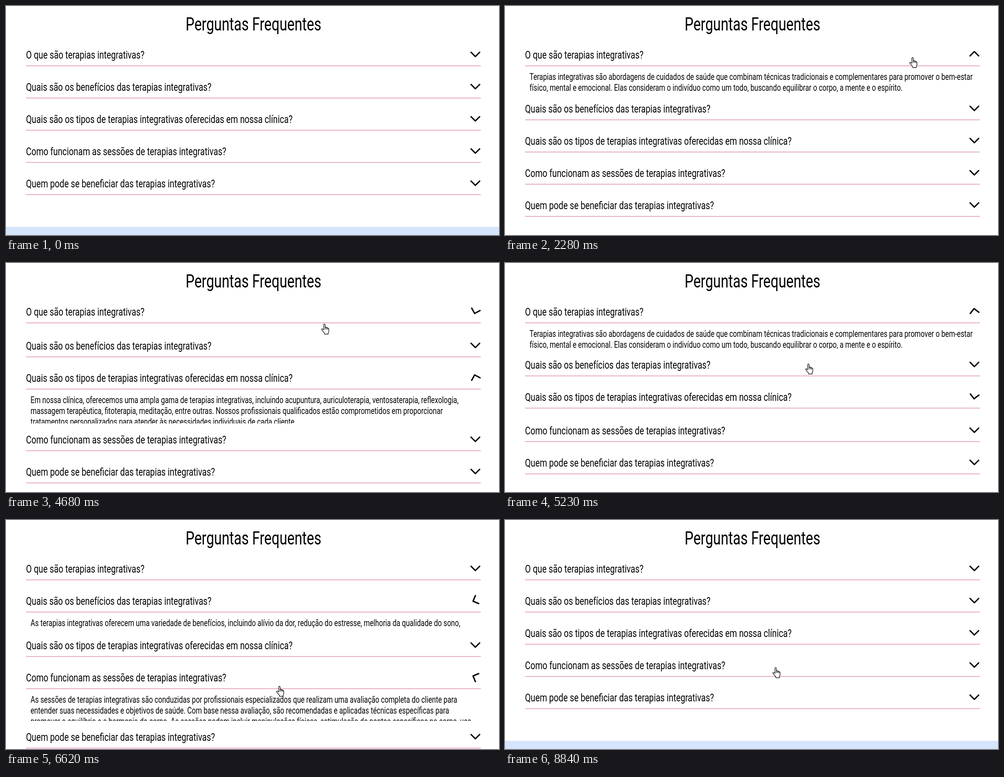
An HTML page for the animation above (8.91 s loop, 1084 by 505 pixels).

```html
<!DOCTYPE html>
<html lang="pt-BR">
<head>
<meta charset="utf-8">
<title>Perguntas Frequentes</title>
<style>
  html, body { margin: 0; width: 100%; height: 100%; overflow: hidden; background: #fff; }
  body { font-family: Roboto, "Liberation Sans", sans-serif; color: #000; }
  #stage { position: relative; width: 1084px; height: 505px; overflow: hidden; }
  /* one factor gives the whole page its condensed look */
  .narrow { display: block; width: max-content; white-space: pre; transform: scaleX(.764); transform-origin: 0 0; }
  h1 { position: absolute; top: 17px; left: 0; width: 1089px; margin: 0; font-size: 40px; font-weight: 400; line-height: 47px; }
  h1 .narrow { margin: 0 auto; transform-origin: 50% 0; }
  #list { position: absolute; top: 92px; left: 0; width: 1084px; }
  .item { margin: 0 40px 20px 44px; }
  .head { position: relative; height: 39px; border-bottom: 2px solid #e8b0c5; font-size: 24px; line-height: 32px; }
  .head svg { position: absolute; right: 0; top: 2px; width: 24px; height: 24px; overflow: visible; }
  .head path { fill: none; stroke: #000; stroke-width: 3; stroke-linecap: round; stroke-linejoin: round; }
  .answer { margin-top: 10px; height: 0; overflow: hidden; font-size: 20px; line-height: 24px; }
  .answer .narrow { position: relative; top: 1px; left: 10px; }
  #band { margin-top: 60px; height: 200px; background: #d6e5fc; }
  #hand { position: absolute; left: 0; top: 0; width: 18px; height: 24px; overflow: visible; }
  #press { fill: #ff0; fill-opacity: .5; }
  #hand path { fill: #fff; stroke: #000; stroke-width: 1.2; stroke-linejoin: round; stroke-linecap: round; }
</style>
</head>
<body>
<div id="stage">
  <h1><span class="narrow">Perguntas Frequentes</span></h1>
  <div id="list"><div id="band"></div></div>
  <svg id="hand">
    <circle id="press" cx="6" cy="0" r="12"/>
    <path d="M5.6 13.4V2.2a1.5 1.5 0 0 1 3.1 0V8c.4-1.1 2.9-.9 2.9.5V9c.5-1 2.8-.8 2.8.7v.5c.5-.8 2.4-.5 2.4 1V16c0 2-1.2 3-1.5 4.6v2.3H7.5V21C6 18.4 2.5 15 1.2 13.2c-1-1.6.8-2.6 2.2-1.6z"/>
    <path d="M8.7 8v4M11.6 9v3M14.4 10v2.2"/>
  </svg>
</div>
<script>
const LOOP = 8910, SLIDE = 500, PRESS = 130;

const faq = [
  ['O que são terapias integrativas?',
   'Terapias integrativas são abordagens de cuidados de saúde que combinam técnicas tradicionais e complementares para promover o bem-estar',
   'físico, mental e emocional. Elas consideram o indivíduo como um todo, buscando equilibrar o corpo, a mente e o espírito.'],
  ['Quais são os benefícios das terapias integrativas?',
   'As terapias integrativas oferecem uma variedade de benefícios, incluindo alívio da dor, redução do estresse, melhoria da qualidade do sono,',
   'fortalecimento do sistema imunológico, aumento da energia e promoção da saúde geral. Elas também podem complementar tratamentos',
   'convencionais e ajudar na gestão de condições crônicas.'],
  ['Quais são os tipos de terapias integrativas oferecidas em nossa clínica?',
   'Em nossa clínica, oferecemos uma ampla gama de terapias integrativas, incluindo acupuntura, auriculoterapia, ventosaterapia, reflexologia,',
   'massagem terapêutica, fitoterapia, meditação, entre outras. Nossos profissionais qualificados estão comprometidos em proporcionar',
   'tratamentos personalizados para atender às necessidades individuais de cada cliente.'],
  ['Como funcionam as sessões de terapias integrativas?',
   'As sessões de terapias integrativas são conduzidas por profissionais especializados que realizam uma avaliação completa do cliente para',
   'entender suas necessidades e objetivos de saúde. Com base nessa avaliação, são recomendadas e aplicadas técnicas específicas para',
   'promover o equilíbrio e a harmonia do corpo. As sessões podem incluir manipulações físicas, estimulação de pontos específicos no corpo, uso',
   'de ervas medicinais, práticas de respiração e relaxamento, entre outras abordagens.'],
  ['Quem pode se beneficiar das terapias integrativas?']
];

// [time, item] of each click; an open item closes, any other one opens alone
const clicks = [[1570, 0], [2490, 0], [3520, 2], [3880, 0], [4362, 2], [4860, 0], [5478, 1], [6440, 3], [7690, 3]];

// [time, x, y] of the pointer
const path = [
  [920, 1084, 78], [1430, 889, 113], [2600, 889, 113], [3320, 693, 209],
  [3400, 693, 243], [3530, 693, 243], [3740, 693, 102], [3890, 693, 102],
  [4230, 693, 292], [4380, 693, 292], [4680, 693, 134], [4750, 693, 106],
  [4870, 693, 106], [5230, 660, 222], [5490, 660, 222], [5850, 631, 265],
  [6300, 594, 385], [6460, 594, 385], [6880, 594, 326], [8600, 594, 326], [8840, 588, 325]
];

const $ = id => document.getElementById(id);
const clamp = v => Math.min(1, Math.max(0, v));

// the CSS "ease" curve, solved by bisection
function ease(x) {
  if (x <= 0 || x >= 1) return clamp(x);
  let lo = 0, hi = 1;
  for (let i = 0; i < 24; i++) {
    const s = (lo + hi) / 2;
    if (.75 * s * (1 - s) + s ** 3 < x) lo = s; else hi = s;
  }
  return .3 * lo * (1 - lo) ** 2 + 3 * lo * lo * (1 - lo) + lo ** 3;
}

const items = faq.map(([question, ...lines]) => {
  const el = document.createElement('div');
  el.className = 'item';
  el.innerHTML = `<div class="head"><span class="narrow">${question}</span>
    <svg><path d="M2.5 8L12 17.5L21.5 8"/></svg></div>
    <div class="answer"><span class="narrow">${lines.join('\n')}</span></div>`;
  $('list').insertBefore(el, $('band'));
  return {
    full: lines.length * 24,
    answer: el.querySelector('.answer'),
    arrow: el.querySelector('path'),
    moves: [{ t: -SLIDE, from: 0, to: 0 }]
  };
});

function level({ moves }, t) {
  const m = moves.findLast(m => m.t <= t);
  return m.from + (m.to - m.from) * ease((t - m.t) / SLIDE);
}

for (const [t, target] of clicks) {
  items.forEach((item, i) => {
    const was = item.moves.at(-1).to;
    const to = i === target ? 1 - was : 0;
    if (to !== was) item.moves.push({ t, from: level(item, t), to });
  });
}

function pointer(t) {
  const i = path.findIndex(p => p[0] > t);
  if (i < 0) return path.at(-1).slice(1);
  const [t0, x0, y0] = path[i - 1], [t1, x1, y1] = path[i];
  const u = (t - t0) / (t1 - t0), k = u * u * (3 - 2 * u);
  return [x0 + (x1 - x0) * k, y0 + (y1 - y0) * k];
}

function draw(t) {
  for (const item of items) {
    const p = level(item, t);
    item.answer.style.height = Math.round(p * item.full) + 'px';
    item.arrow.setAttribute('transform', `rotate(${p * 180} 12 12)`);
  }
  const shown = t >= path[0][0];
  $('hand').style.display = shown ? '' : 'none';
  if (!shown) return;
  const [x, y] = pointer(t).map(Math.round);
  $('hand').style.transform = `translate(${x}px, ${y}px)`;
  $('press').style.display = clicks.some(([c]) => t >= c - PRESS && t < c) ? '' : 'none';
}

const start = performance.now();
function tick() {
  draw((performance.now() - start) % LOOP);
  requestAnimationFrame(tick);
}
tick();
</script>
</body>
</html>
```
